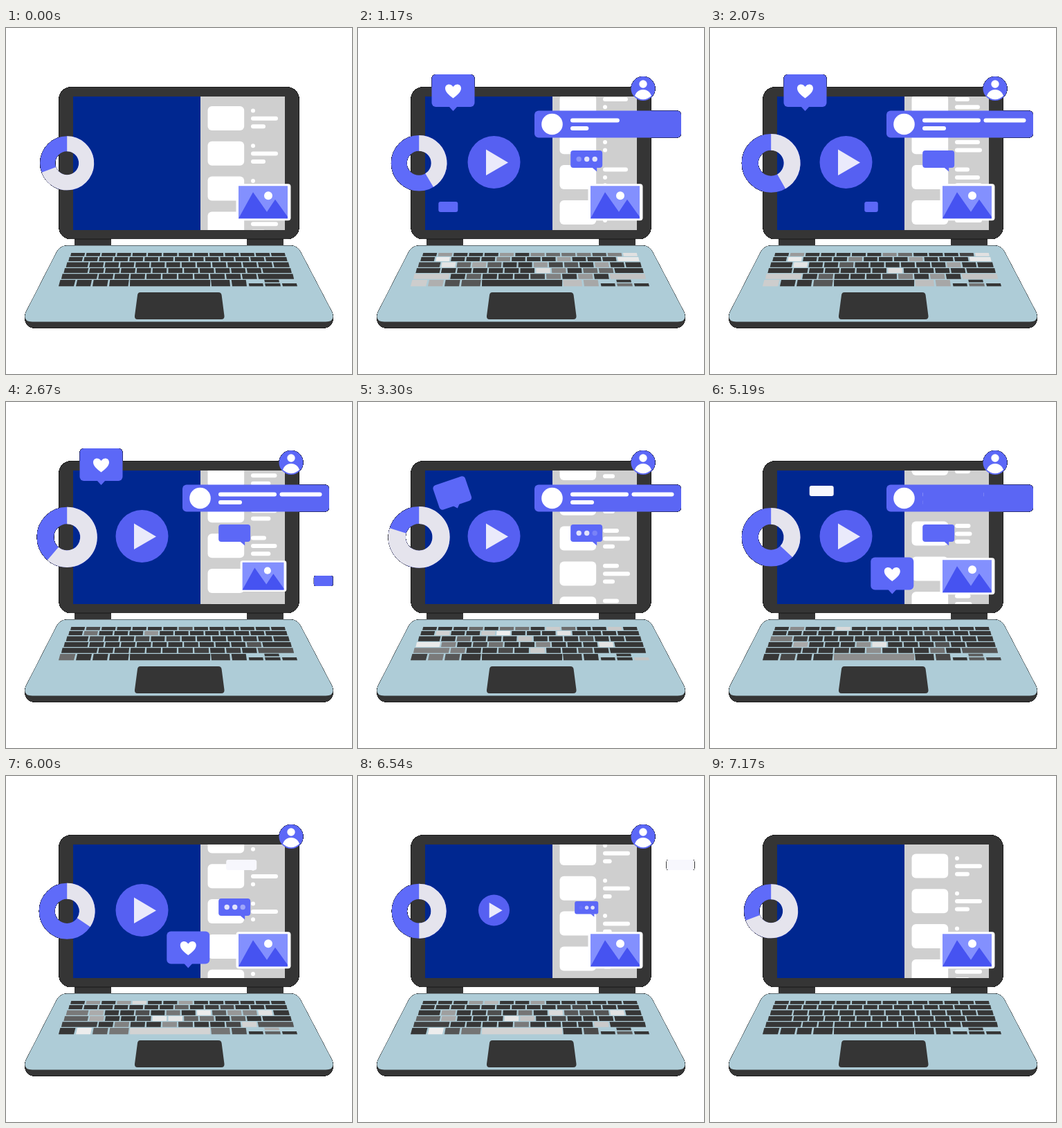
An HTML page that plays this animation: 500 by 500 pixels, repeating every 7.23 s.

```html
<!DOCTYPE html>
<html lang="en">
<head>
<meta charset="utf-8">
<title>Laptop</title>
<style>
html, body { margin: 0; width: 100%; height: 100%; overflow: hidden; background: #fff; }
svg { display: block; width: 100vw; height: 100vh; }
.dark { fill: #353535; }
.violet { fill: #5c68f7; }
.white { fill: #fff; }
</style>
</head>
<body>
<svg viewBox="0 0 500 500">
  <defs>
    <clipPath id="panelClip"><rect x="281" y="99" width="122" height="193"/></clipPath>
    <!-- hard black rim where the silhouette meets the page -->
    <filter id="rim" filterUnits="userSpaceOnUse" x="0" y="0" width="500" height="500" color-interpolation-filters="sRGB">
      <feComponentTransfer in="SourceAlpha" result="edge"><feFuncA type="linear" slope="5"/></feComponentTransfer>
      <feMerge><feMergeNode in="edge"/><feMergeNode in="SourceGraphic"/></feMerge>
    </filter>
  </defs>
  <g filter="url(#rim)">

  <!-- laptop -->
  <rect class="dark" x="76.5" y="85.6" width="347" height="219.400" rx="17"/>
  <path class="dark" d="M99 305h53v10h-53zM348 305h53v10h-53z"/>
  <path d="M99 305h53M348 305h53" stroke="#111" stroke-width=".8"/>
  <rect x="97" y="99" width="184" height="193" fill="#002790"/>
  <rect x="281" y="99" width="122" height="193" fill="#cfcfcf"/>
  <g id="panel" clip-path="url(#panelClip)" class="white"></g>
  <path class="dark" d="M27 416Q27 433.600 42 433.600H458Q473 433.600 473 416Z"/>
  <path fill="#aeccd7" d="M88 314.500H412Q421 314.500 426 324L471.500 411Q476 424.500 462 424.500H38Q24 424.500 28.500 411L73 324Q78 314.500 88 314.500Z"/>
  <g id="keys"></g>
  <path class="dark" d="M194 382H307Q311 382 311.600 386L315.500 416Q316 421 311 421H190Q185.500 421 186 416L190 386Q190.500 382 194 382Z"/>

  <!-- floating parts -->
  <rect id="tagA" class="violet" y="251" height="15" rx="3"/>
  <rect id="tagB" fill="#f7f7fd" y="121" height="15" rx="3"/>
  <g id="donut">
    <circle r="28" fill="none" stroke="#5f6bf9" stroke-width="22"/>
    <path id="slice" fill="none" stroke="#e5e4ed" stroke-width="22"/>
  </g>
  <g id="play">
    <circle r="38" fill="#5660f2"/>
    <path d="M-11.500-18.500V19L20.500 .5Z" fill="#eaeafb"/>
  </g>
  <g id="chat">
    <rect class="violet" x="-23" y="-15.500" width="46" height="25" rx="4"/>
    <path class="violet" d="M8 9H15V15Z"/>
    <g id="dots" fill="#f1f1fb">
      <circle cx="-11" cy="-3" r="3.700"/><circle cx=".5" cy="-3" r="3.700"/><circle cx="12" cy="-3" r="3.700"/>
    </g>
  </g>
  <g id="bar">
    <rect x="-106" y="-19.500" width="212" height="39" rx="6" fill="#5b66f4"/>
    <circle class="white" cx="-80.500" r="15.300"/>
    <g id="barLines" class="white">
      <rect x="-54" y="-8.500" height="6" rx="3"/>
      <rect x="34.500" y="-8.500" height="6" rx="3"/>
      <rect x="-54" y="3" height="6" rx="3"/>
    </g>
  </g>
  <g id="bubble">
    <rect class="violet" x="-31" y="-23.500" width="62" height="47" rx="6"/>
    <path class="violet" d="M-6 23H6L0 29.500Z"/>
    <path id="heart" class="white" d="M0 11C-5 7-11.500 2.500-11.500-3.500C-11.500-9.500-4-11.500 0-5.500C4-11.500 11.500-9.500 11.500-3.500C11.500 2.500 5 7 0 11Z"/>
  </g>
  <g id="photo">
    <rect class="white" x="-39.500" y="-26.500" width="79" height="53" rx="4"/>
    <path d="M-36-23.500H35V23.500H-36Z" fill="#8390fe"/>
    <path d="M-36 23.500L-15-14.500L5 14L17-4L35 21V23.500Z" fill="#4653f1"/>
    <circle class="white" cx="7" cy="-9.500" r="6"/>
  </g>
  <g id="avatar">
    <circle class="violet" r="17.500"/>
    <circle class="white" cy="-6.500" r="5.700"/>
    <path class="white" d="M-12 10.500C-8-1.500 8-1.500 12 10.500Q0 21-12 10.500Z"/>
  </g>
  </g>
</svg>
<script>
const LOOP = 7230, STEP = 30;
const $ = id => document.getElementById(id);
const clamp = v => Math.max(0, Math.min(1, v));
const smooth = v => v * v * (3 - 2 * v);
const ramp = (t, a, b) => smooth(clamp((t - a) / (b - a)));

function make(parent, attrs) {
  const el = document.createElementNS('http://www.w3.org/2000/svg', 'rect');
  for (const k in attrs) el.setAttribute(k, attrs[k]);
  return parent.appendChild(el);
}

// stops: [time, value] pairs
function track(t, stops, ease = smooth) {
  if (t <= stops[0][0]) return stops[0][1];
  for (let i = 1; i < stops.length; i++) {
    const [t0, v0] = stops[i - 1], [t1, v1] = stops[i];
    if (t <= t1) return v0 + (v1 - v0) * ease((t - t0) / (t1 - t0));
  }
  return stops[stops.length - 1][1];
}
const linear = v => v;

function place(el, x, y, scale, turn = 0) {
  el.setAttribute('transform', `translate(${x} ${y}) rotate(${turn}) scale(${scale})`);
  el.style.display = scale > 0.005 ? '' : 'none';
}

let seed = 11;
function random() {
  seed = (seed * 16807) % 2147483647;
  return seed / 2147483647;
}

// keyboard rows: top, bottom, key count, first and last key width
const rows = [
  [325, 329.7, 14, 1, 1], [331, 337, 14, 1, 1.5], [338.5, 345.8, 14, 1.5, 1.1],
  [347, 354, 13, 1.6, 1.9], [355.3, 362.8, 12, 2.3, 2.3]
];
// brightest keys in each typing burst, as row.index
const bright = [
  '0.13 1.1 1.13 2.1 3.7 4.0 4.11 5.0 5.5',
  '0.8 0.12 1.1 1.4 1.5 1.9 2.6 3.0 3.11 4.6 5.10',
  '0.4 2.8 2.12 3.5 3.6 4.10 5.1 5.4'
].map(list => list.split(' '));
const bursts = [[150, 2300], [2550, 4650], [4900, 6450]];
const keys = [];

function addKey(row, index, x0, x1, y0, y1) {
  const el = make($('keys'), { x: x0, y: y0, width: x1 - x0, height: y1 - y0 });
  const name = row + '.' + index;
  el.setAttribute('transform', `translate(${x0} ${y1}) skewX(${(x0 + x1 - 497) / 22}) translate(${-x0} ${-y1})`);
  const glow = bursts.map(([start, end], i) => {
    const top = bright[i].includes(name);
    const shade = random(), lit = random() < 0.4;
    const level = top ? 0.65 + shade * 0.33 : lit ? shade * 0.6 : 0;
    const on = start + random() * (top ? 400 : 600);
    const off = top || random() < 0.45 ? end + random() * 250 : on + 600 + random() * 700;
    return { level, on, off };
  });
  keys.push({ el, glow });
}

rows.forEach(([y0, y1, count, first, last], r) => {
  const left = 93 - (y1 - 330) * 0.4, right = 404 + (y1 - 330) * 0.37;
  const unit = (right - left + 2.4) / (count - 2 + first + last);
  let x = left;
  for (let i = 0; i < count; i++) {
    const w = unit * (i === 0 ? first : i === count - 1 ? last : 1);
    addKey(r, i, x, x + w - 2.4, y0, y1);
    x += w;
  }
});
[[76, 98], [101, 122], [125, 146], [149, 176.5], [179, 295], [297, 324], [327, 348]]
  .forEach(([a, b], i) => addKey(5, i, a, b, 364, 373.3));
addKey(5, 7, 351.5, 372, 369, 373.3);
addKey(5, 8, 374, 395, 363.8, 367.5);
addKey(5, 9, 375, 397, 369, 373.3);
addKey(5, 10, 400, 421, 369, 373.3);

// side list
const cards = [];
for (let i = 0; i < 6; i++) {
  const card = make($('panel'), { x: 291.5, width: 52.7, height: 35, rx: 6 });
  const lines = [0, 1, 2].map(() => make($('panel'), { x: 354, height: 6, rx: 3 }));
  cards.push({ card, lines });
}
const scroll = [[0, 113], [1100, 96.5], [2150, 96.5], [3300, 78], [4380, 65.5], [6000, 76.5], [7100, 112.5]];
const beats = [0, 1170, 2070, 3300, 4380, 6000, 7170];
const widths = [
  [6, 36, 21, 23, 39, 6, 6], [39, 6, 36, 39, 10, 39, 39], [21, 6, 39, 17, 38, 6, 21]
].map(list => list.map((w, i) => [beats[i], w]));

const angles = [[0, 250], [1170, 149], [2070, 150.5], [3250, 287], [3330, 287], [4380, 142], [6000, 124], [7170, 250]];

function drawPanel(t) {
  const top = track(t, scroll);
  const w = widths.map(stops => track(t, stops));
  cards.forEach(({ card, lines }, i) => {
    const y = top + (i - 1) * 50.8;
    card.setAttribute('y', y);
    lines.forEach((line, k) => {
      line.setAttribute('y', y + 3.4 + k * 11.4);
      line.setAttribute('width', w[k]);
    });
  });
}

function drawKeys(t) {
  for (const { el, glow } of keys) {
    const v = glow.reduce((sum, g) =>
      sum + g.level * ramp(t, g.on, g.on + 220) * (1 - ramp(t, g.off, g.off + 260)), 0);
    const c = Math.round(54 + 201 * clamp(v));
    el.setAttribute('fill', `rgb(${c},${c},${c})`);
  }
}

function drawDonut(t) {
  const r = 39 + 5.5 * (1 - Math.cos(t / LOOP * 2 * Math.PI)) / 2;
  place($('donut'), 88.2, 195.3, r / 39);
  const a = track(t, angles), rad = a * Math.PI / 180;
  $('slice').setAttribute('d',
    `M0-28A28 28 0 ${a > 180 ? 1 : 0} 1 ${28 * Math.sin(rad)} ${-28 * Math.cos(rad)}`);
}

function drawTag(el, t, centre, width) {
  const shown = t >= centre[0][0] && t <= centre[centre.length - 1][0];
  const w = track(t, width, linear);
  el.style.display = shown ? '' : 'none';
  el.setAttribute('x', track(t, centre, linear) - w / 2);
  el.setAttribute('width', w);
}

function drawBubble(t) {
  if (t < 3630) {
    const drop = track(t, [[3120, 0], [3300, 41], [3510, 110]], linear);
    const size = track(t, [[3120, 1], [3300, 0.79], [3510, 0]], linear);
    place($('bubble'), 137.5 - drop * 0.03, 90.5 + drop, ramp(t, 90, 480) * size, -drop * 0.46);
  } else {
    place($('bubble'), 263.3, 248, ramp(t, 3660, 3960) * (1 - ramp(t, 6250, 6550)));
  }
  const beat = t < 3630
    ? ramp(t, 350, 600) * (1 - ramp(t, 3030, 3210))
    : ramp(t, 3870, 4110) * (1 - ramp(t, 6100, 6300));
  $('heart').setAttribute('transform', `scale(${beat})`);
}

function drawBar(t) {
  place($('bar'), 361, 139, ramp(t, 780, 1050) * (1 - ramp(t, 5190, 5490)));
  const [a, b, c] = $('barLines').children;
  const gone = 1 - ramp(t, 4900, 5200);
  a.setAttribute('width', 84 * ramp(t, 900, 1260) * gone);
  b.setAttribute('width', 61 * ramp(t, 1230, 1560) * gone);
  c.setAttribute('width', 34 * ramp(t, 900, 1290) * gone);
}

function drawChat(t) {
  place($('chat'), 330.2, 192.5, ramp(t, 480, 780) * (1 - ramp(t, 6450, 6720)));
  const phase = (t + 2660 - 300) % 2660;
  [...$('dots').children].forEach((dot, i) => {
    const on = ramp(phase, i * 140, 200 + i * 140);
    const off = ramp(phase, 750 + i * 130, 950 + i * 130);
    dot.setAttribute('opacity', 0.9 * on * (1 - off));
  });
}

function draw(t) {
  drawPanel(t);
  drawKeys(t);
  drawDonut(t);
  drawTag($('tagA'), t, [[780, 22], [1170, 130.3], [2070, 233], [2700, 470]],
    [[1170, 28], [2070, 19.5], [2700, 28]]);
  drawTag($('tagB'), t, [[4560, 22], [6000, 340.2], [6600, 480]],
    [[4560, 28], [6000, 44], [6600, 40]]);
  place($('play'), 196.5, 194, ramp(t, 300, 690) * (1 - ramp(t, 6400, 6720)));
  drawChat(t);
  drawBar(t);
  drawBubble(t);
  place($('photo'), 372, 251.7, 1 - ramp(t, 2580, 2940) + ramp(t, 3780, 4110));
  place($('avatar'), 412, 87.5, ramp(t, 570, 840) * (1 - ramp(t, 6690, 6960)));
}

const begin = performance.now();
function tick() {
  const t = (performance.now() - begin) % LOOP;
  draw(Math.min(Math.floor(t / STEP) * STEP, LOOP - 2 * STEP));
  requestAnimationFrame(tick);
}
tick();
</script>
</body>
</html>
```
